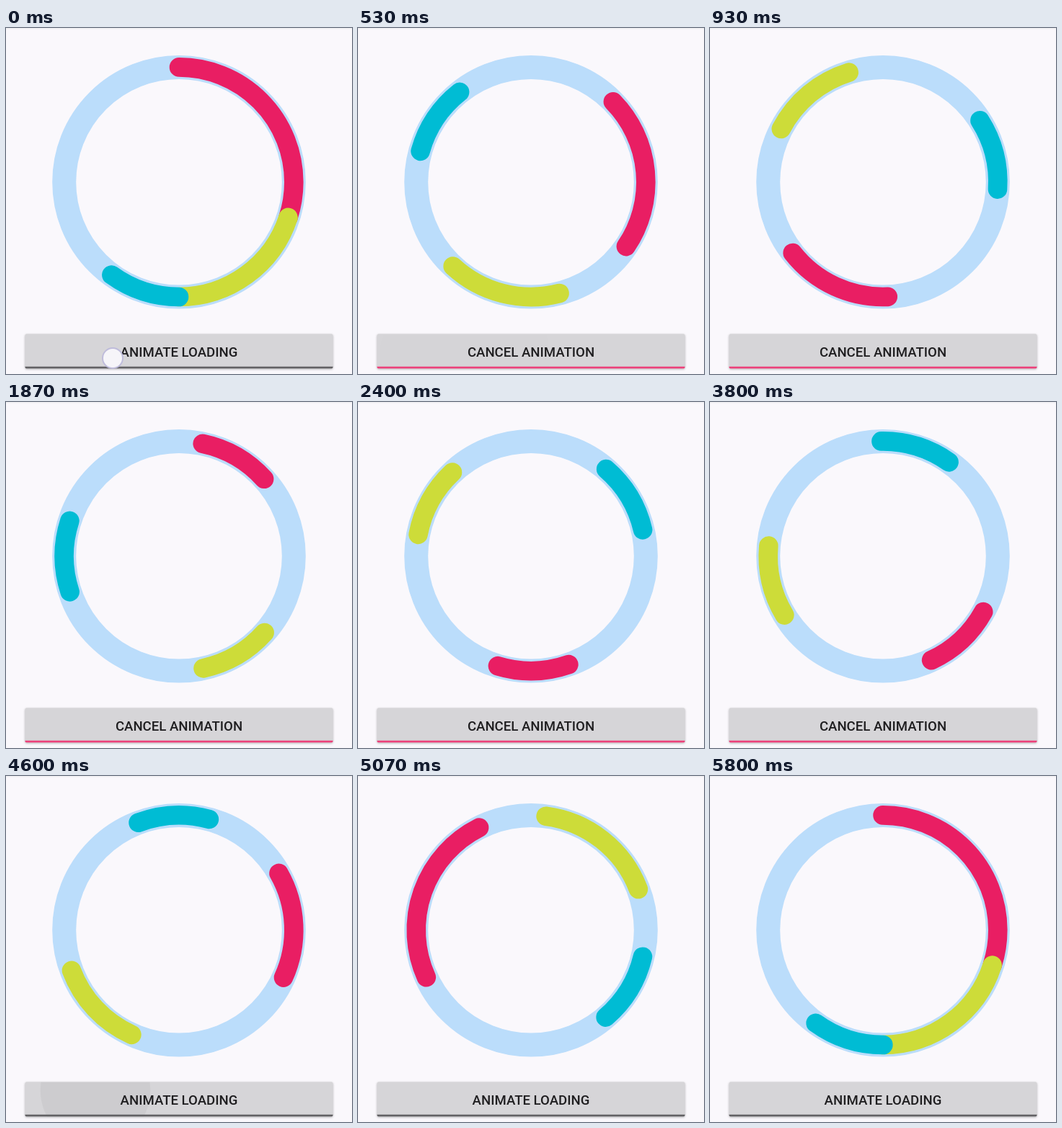
An HTML page that plays this animation: 480 by 480 pixels, repeating every 5.87 s.

```html
<!DOCTYPE html>
<html lang="en">
<head>
<meta charset="utf-8">
<title>Ring loading</title>
<style>
  html, body { margin: 0; width: 100%; height: 100%; overflow: hidden; background: #faf8fc; }
  svg { display: block; width: 100vw; height: 100vh; }
  .track, .arc { fill: none; }
  .track { stroke: #bbddfb; stroke-width: 33; }
  .arc { stroke-width: 26.6; stroke-linecap: round; }
  .face { fill: #d6d5d8; filter: drop-shadow(0 1px 1.5px rgba(0, 0, 0, .28)); }
  .label { font: 500 18.6px Roboto, "Open Sans", sans-serif; fill: #1f1e20; text-anchor: middle; }
  .pointer { fill: #f6f5f9; stroke: #bfbcdb; stroke-width: 2; }
</style>
</head>
<body>
<svg viewBox="0 0 480 480">
  <defs>
    <clipPath id="buttonClip"><rect x="26.5" y="424.5" width="427" height="48" rx="2"/></clipPath>
  </defs>
  <rect width="480" height="480" fill="#faf8fc"/>
  <rect width="480" height="1.5" fill="#f0eff2"/>
  <circle class="track" cx="240" cy="213.7" r="159.3"/>
  <g id="ring"></g>
  <rect class="face" x="26.5" y="424.5" width="427" height="48" rx="2"/>
  <g clip-path="url(#buttonClip)">
    <circle id="ripple" fill="#000"/>
    <rect id="underline" x="26" y="469.7" width="428" height="3"/>
  </g>
  <text id="label" class="label" x="240" y="455.7"></text>
  <circle id="pointer" class="pointer" r="14"/>
</svg>
<script>
const LOOP = 5870;
const SPIN_START = 180, SPIN_TIME = 1515;
const STOP_START = 4410, STOP_TIME = 1420, STOP_ANGLE = 320;
const LOADING_SWEEP = 36, SPACING = 120;
const slices = [
  { color: '#e91e63', sweep: 108 },
  { color: '#cddc39', sweep: 72 },
  { color: '#00bcd4', sweep: 36 }
];
const taps = [
  { x: 148, y: 458, drift: 6, show: 0, hide: 180, ripple: 110 },
  { x: 124, y: 436, drift: 0, show: 4195, hide: 4400, ripple: 4330 }
];

const byId = id => document.getElementById(id);
const setAttrs = (el, attrs) => {
  for (const key in attrs) el.setAttribute(key, attrs[key]);
};
const progress = (t, start, time) => Math.min(1, Math.max(0, (t - start) / time));
const decelerate = u => 1 - (1 - u) ** 2;
const easeInOut = u => (1 - Math.cos(Math.PI * u)) / 2;
const mix = (a, b, u) => a + (b - a) * u;

const arcs = slices.map(slice => {
  const arc = document.createElementNS('http://www.w3.org/2000/svg', 'circle');
  setAttrs(arc, { class: 'arc', cx: 240, cy: 213.7, r: 159.3, pathLength: 360, stroke: slice.color });
  return byId('ring').appendChild(arc);
});

function drawRing(t) {
  const stopping = t >= STOP_START;
  const closed = decelerate(progress(t, STOP_START, STOP_TIME));
  const opened = decelerate(progress(t, SPIN_START, SPIN_TIME));
  const spread = easeInOut(progress(t, SPIN_START, 200));
  const turns = Math.max(0, t - SPIN_START) / SPIN_TIME;
  const rotation = stopping ? mix(STOP_ANGLE, 720, closed) : 360 * easeInOut(turns % 1);

  let before = 0;
  slices.forEach((slice, i) => {
    const full = stopping ? closed : 1 - opened;
    const sweep = mix(LOADING_SWEEP, slice.sweep, full);
    const offset = stopping
      ? before + i * SPACING * (1 - closed)
      : mix(before, i * SPACING, spread);
    setAttrs(arcs[i], {
      'stroke-dasharray': `${sweep} 360`,
      transform: `rotate(${rotation + offset - 90} 240 213.7)`
    });
    before += sweep;
  });
}

function drawButton(t) {
  const loading = t >= 195 && t < STOP_START;
  const text = loading ? 'CANCEL ANIMATION' : 'ANIMATE LOADING';
  if (byId('label').textContent !== text) byId('label').textContent = text;
  byId('underline').setAttribute('fill', loading ? '#ec407a' : '#626164');

  const tap = taps[t < 2000 ? 0 : 1];
  const drop = tap.drift * progress(t, tap.show + 60, 110);
  setAttrs(byId('pointer'), {
    cx: tap.x, cy: tap.y + drop,
    visibility: t >= tap.show && t < tap.hide ? 'visible' : 'hidden'
  });
  const fade = 1 - progress(t, tap.ripple + 240, 200);
  setAttrs(byId('ripple'), {
    cx: tap.x, cy: tap.y,
    r: 76 * Math.max(0, t - tap.ripple) / 270,
    opacity: t < tap.ripple ? 0 : 0.05 * fade
  });
}

const start = performance.now();
function draw() {
  const t = (performance.now() - start) % LOOP;
  drawRing(t);
  drawButton(t);
  requestAnimationFrame(draw);
}
draw();
</script>
</body>
</html>
```
